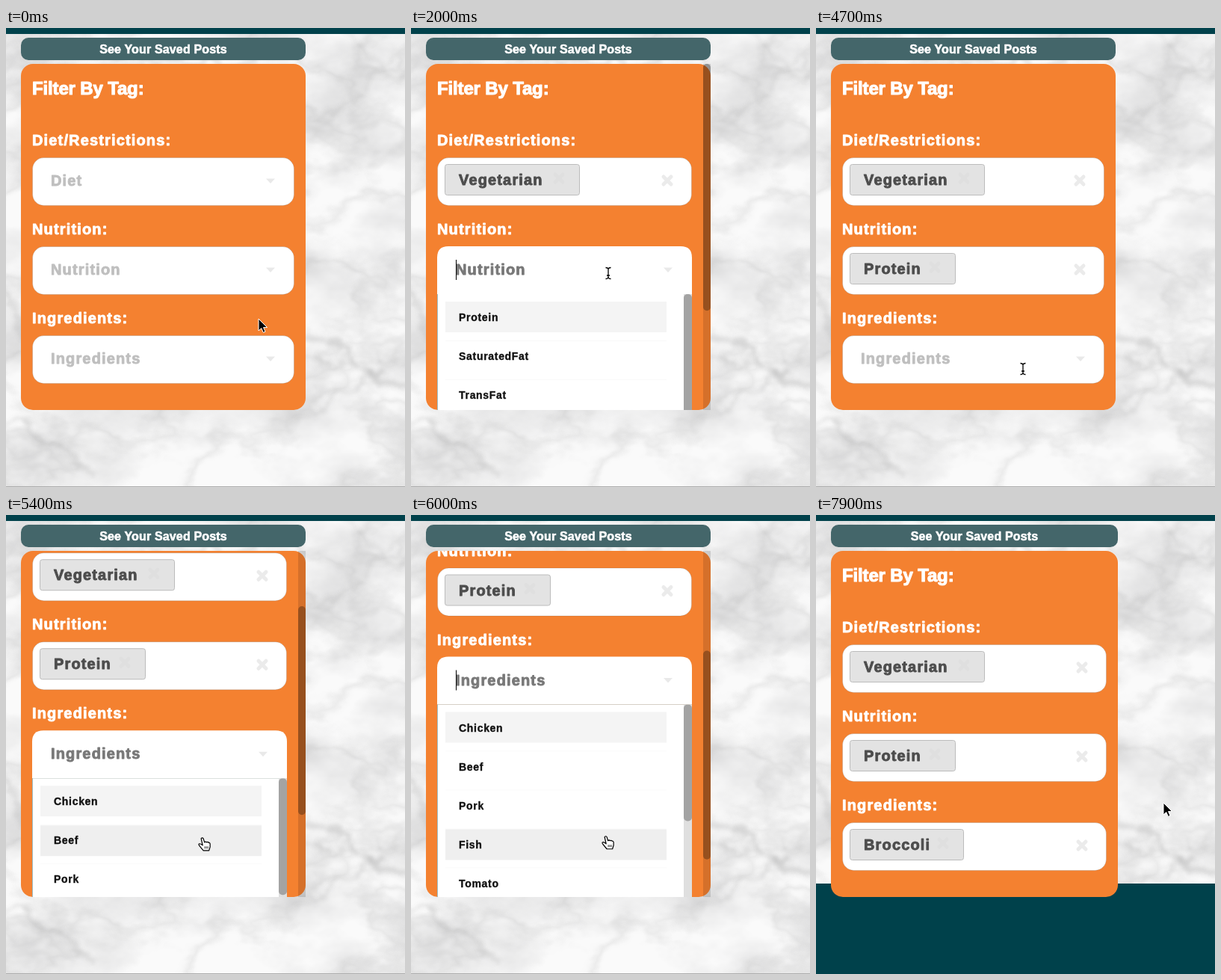
Recreate the animation shown at these times as an HTML page. Size 534 by 614 pixels, loop 8000 ms.

```html
<!DOCTYPE html>
<html lang="en">
<head>
<meta charset="utf-8">
<title>Tag filter</title>
<style>
  html, body { margin: 0; width: 100%; height: 100%; overflow: hidden; background: #f8f8f8; }
  svg { position: absolute; left: 0; top: 0; display: block; }
  #marble { will-change: transform; }
  text {
    font: bold 20px "Liberation Sans", Arial, sans-serif;
    letter-spacing: 1.15px;
    fill: currentColor; stroke: currentColor;
    stroke-width: .9; stroke-linejoin: round;
  }
  .title { font-size: 24px; letter-spacing: -.15px; stroke-width: 1.1; }
  .button { font-size: 16px; letter-spacing: .15px; stroke-width: .6; }
  .item { font-size: 14px; letter-spacing: .7px; stroke-width: .35; }
</style>
</head>
<body>
<svg id="marble" width="534" height="614" viewBox="0 0 534 614">
  <defs>
    <filter id="clouds" x="0" y="0" width="1" height="1" color-interpolation-filters="sRGB">
      <feTurbulence type="fractalNoise" baseFrequency=".008 .011" numOctaves="5" seed="11"/>
      <feColorMatrix values="0 0 0 0 .55  0 0 0 0 .55  0 0 0 0 .56  .55 0 0 0 -.2"/>
    </filter>
    <filter id="ridges" x="0" y="0" width="1" height="1" color-interpolation-filters="sRGB">
      <feTurbulence type="fractalNoise" baseFrequency=".006 .009" numOctaves="5" seed="4"/>
      <feColorMatrix values="0 0 0 0 .5  0 0 0 0 .5  0 0 0 0 .5  0 1 0 0 0"/>
      <feComponentTransfer><feFuncA type="table" tableValues="0 0 0 0 0 0 .02 .12 .01 0 0 0 0 0 0"/></feComponentTransfer>
    </filter>
    <filter id="rough" x="-100" y="-100" width="800" height="900" filterUnits="userSpaceOnUse">
      <feTurbulence type="fractalNoise" baseFrequency=".03" numOctaves="4" seed="7"/>
      <feDisplacementMap in="SourceGraphic" scale="40" xChannelSelector="R" yChannelSelector="G"/>
      <feGaussianBlur stdDeviation="2.5"/>
    </filter>
  </defs>
  <rect width="534" height="614" fill="#fafafa"/>
  <rect width="534" height="614" filter="url(#clouds)"/>
  <rect width="534" height="614" filter="url(#ridges)"/>
  <g filter="url(#rough)" fill="none" stroke="#777" stroke-linecap="round">
    <path d="M385 405Q450 425 475 455T560 475" stroke-width="9" opacity=".17"/>
    <path d="M400 440Q450 455 560 440M385 520Q440 500 500 462" stroke-width="5" opacity=".14"/>
    <path d="M440 -10Q480 50 550 70M410 130Q460 110 510 40" stroke-width="5" opacity=".12"/>
    <path d="M-20 340Q20 370 30 430M-20 520Q60 540 120 600" stroke-width="9" opacity=".12"/>
    <path d="M120 30Q220 55 340 40" stroke-width="8" opacity=".16"/>
  </g>
</svg>
<svg id="stage" width="534" height="614" viewBox="0 0 534 614"></svg>
<script>
const LOOP = 8000, STEP = 100;
const TOP = 48, VIEW = 463, MENU = 341, PITCH = 52;
const TEAL = '#00414b';

const fields = [
  { label: 'Diet/Restrictions:', hint: 'Diet', y: 173, open: 600, pick: 1400, chip: 181,
    items: ['Vegetarian', 'Vegan', 'Pescatarian', 'Keto', 'Paleo', 'GlutenFree', 'DairyFree', 'NutFree'] },
  { label: 'Nutrition:', hint: 'Nutrition', y: 292, open: 1900, pick: 4200, chip: 142,
    items: ['Protein', 'SaturatedFat', 'TransFat', 'Carbs', 'Sodium', 'Sugar', 'Fiber',
      'Calcium', 'Iron', 'Potassium', 'VitaminA', 'VitaminC', 'VitaminD'] },
  { label: 'Ingredients:', hint: 'Ingredients', y: 411, open: 4800, pick: 7300, chip: 153, choice: 5,
    items: ['Chicken', 'Beef', 'Pork', 'Fish', 'Tomato', 'Broccoli', 'Potato', 'Rice',
      'Onion', 'Garlic', 'Cheese', 'Egg', 'Carrot', 'Beans'] }
];

// Tracks of [time, value, ...]; values ease between neighbours.
const pointer = [
  [0, 338, 389], [100, 338, 389], [500, 265, 208], [900, 265, 208], [1200, 200, 270], [1400, 200, 270],
  [1900, 264, 328], [2300, 264, 328], [2800, 188, 416], [3400, 188, 416], [3900, 190, 388],
  [4200, 190, 388], [4700, 277, 456], [5000, 277, 456], [5500, 261, 429], [6700, 260, 431],
  [7100, 262, 456], [7300, 262, 456], [7900, 465, 385]
];
const panelScroll = [[0, 0], [5000, 0], [5500, 137], [5700, 137], [6300, 306], [7300, 306]];
const listScroll = [[0, 0], [2800, 0], [3200, 31], [3400, 31], [3800, 0]];

function sample(track, t) {
  const i = track.findIndex(k => k[0] > t);
  if (i < 0) return track[track.length - 1].slice(1);
  const a = track[i - 1], b = track[i];
  const p = (t - a[0]) / (b[0] - a[0]), e = p * p * (3 - 2 * p);
  return a.slice(1).map((v, n) => v + (b[n + 1] - v) * e);
}

const rect = (x, y, w, h, fill, r = 0, more = '') =>
  `<rect x="${x}" y="${y}" width="${w}" height="${h}" rx="${r}" fill="${fill}" ${more}/>`;
const text = (x, y, s, color, cls = '', more = '') =>
  `<text x="${x}" y="${y}" color="${color}" class="${cls}" ${more}>${s}</text>`;
const cross = (x, y, color) =>
  `<path d="M${x - 5} ${y - 5}l10 10m0 -10l-10 10" stroke="${color}" stroke-width="5" stroke-linecap="round"/>`;
const clip = (id, shape, body) =>
  `<clipPath id="${id}">${shape}</clipPath><g clip-path="url(#${id})">${body}</g>`;

function cursor(kind, x, y) {
  const shapes = {
    arrow: '<path d="M0 0V16L3.8 12.6L6.4 18.4L9 17.2L6.5 11.6H11.6Z" fill="#000" stroke="#fff"/>',
    beam: ['#fff" stroke-width="3', '#000" stroke-width="1.3'].map(s =>
      `<path d="M-3.5 -7.5Q0 -7.5 0 -5V5Q0 7.5 -3.5 7.5M3.5 -7.5Q0 -7.5 0 -5V5Q0 7.5 3.5 7.5M-2 3H2" fill="none" stroke="${s}"/>`).join(''),
    hand: `<path d="M-1.5 1Q0 -1 1.5 1L3 6Q4.500 4.500 6 6Q7.500 5 8.500 6.500Q10 6 10.500 8L10.500 12L9 17H1.500L-3.500 11Q-5.500 8.500 -4 8Q-2.500 7.500 .5 10Z"
      fill="#fff" stroke="#000" stroke-width="1.2" stroke-linejoin="round"/><path d="M3.500 11.500v3m2 -3v3m2 -3v3" stroke="#000" stroke-width=".8"/>`
  };
  return `<g transform="translate(${x} ${y})">${shapes[kind]}</g>`;
}

function menu(f, right, scroll, over) {
  const y = f.y + 64, size = f.items.length * PITCH + 17;
  const thumb = MENU * MENU / size;
  let rows = '';
  f.items.forEach((name, i) => {
    const top = y + 10 + i * PITCH - scroll;
    const fill = i === over ? '#efefef' : i === 0 ? '#f4f4f4' : '#fff';
    if (i) rows += rect(46, top, 296, 1, '#f9f9f9');
    rows += rect(46, top + (i ? 1 : 0), 296, 41, fill) + text(64, top + 26, name, '#111', 'item');
  });
  return rect(35, y, right - 35, MENU, '#96bfcb') +
    clip('list', rect(36, y, right - 36, MENU - 1, '#000'),
      rect(36, y, right - 36, MENU, '#fff') + rows +
      rect(right - 11, y, 11, MENU, '#dfdfdf') +
      rect(right - 11, y + scroll * MENU / size, 11, thumb, '#a3a3a3', 5));
}

function field(f, t, right, isOpen) {
  const { y } = f, w = right - 35, r = 15;
  const border = 'stroke="#22242626"';
  let out = text(35, y - 16, f.label, '#fff');
  out += isOpen
    ? `<path d="M35 ${y + 64}V${y + r}q0 ${-r} ${r} ${-r}H${right - r}q${r} 0 ${r} ${r}V${y + 64}Z" fill="#fff"/>`
    : rect(35.5, y + .5, w - 1, 64, '#fff', r, border);
  if (t >= f.pick) {
    out += rect(45.5, y + 9.5, f.chip - 1, 41, '#e3e3e3', 3, 'stroke="#bcbcbc"') +
      text(64, y + 37, f.items[f.choice || 0], '#4d4d4d') +
      cross(45 + f.chip - 28, y + 28, '#dfdfdf') + cross(right - 33, y + 31, '#ebebeb');
  } else {
    out += text(60, y + 38, f.hint, isOpen ? '#787878' : '#bfbfbf') +
      `<path d="M${right - 38} ${y + 28.5}h12l-6 6.500z" fill="#e9e9e9"/>`;
    if (isOpen && (t - f.open) % 1000 < 500) out += rect(60, y + 18, 1, 27, '#000');
  }
  return out;
}

function scene(t) {
  const done = t >= 7300;
  const open = fields.find(f => t >= f.open && t < f.pick);
  const edge = done ? 404 : 401, width = edge - 20;
  const right = edge - 15 - (open ? 10 : 0);
  const scroll = open ? sample(panelScroll, t)[0] : 0;
  const rowScroll = open === fields[1] ? sample(listScroll, t)[0] : 0;
  const [x, y] = sample(pointer, t);

  let kind = 'arrow', over = -1;
  const py = y + scroll;
  if (open && x > 46 && x < 342 && py > open.y + 64) {
    const d = py - open.y - 74 + rowScroll, i = Math.floor(d / PITCH);
    if (d >= 0 && d - i * PITCH < 41) { over = i; kind = 'hand'; }
  } else if (x > 35 && x < right - 45 && fields.some(f => py > f.y && py < f.y + 64)) kind = 'beam';

  let body = rect(20, TOP, width, VIEW, '#f48130');
  let inner = text(35, 89, 'Filter By Tag:', '#fff', 'title') +
    fields.map(f => field(f, t, right, f === open)).join('');
  if (open) inner += menu(open, right, rowScroll, over);
  body += `<g transform="translate(0 ${-scroll})">${inner}</g>`;

  let out = rect(0, 0, 534, 8, TEAL);
  out += done ? rect(0, 493, 534, 121, TEAL) : rect(0, 613, 534, 1, '#adadad');
  out += rect(20, 13, width, 30, '#44666a', 10) +
    text(20 + width / 2, 34, 'See Your Saved Posts', '#fff', 'button', 'text-anchor="middle"') +
    clip('panel', rect(20, TOP, width, VIEW, '#000', 16), body);
  if (open) {
    const size = open.y + 64 + MENU - TOP;
    out += rect(391, TOP, 10, VIEW, 'rgba(0,0,0,.13)') +
      rect(391, TOP + scroll * VIEW / size, 10, VIEW * VIEW / size, 'rgba(0,0,0,.29)', 5);
  }
  return out + cursor(kind, x, y);
}

const stage = document.getElementById('stage');
const start = performance.now();
let last = -1;
function draw() {
  const t = Math.floor((performance.now() - start) % LOOP / STEP) * STEP;
  if (t !== last) stage.innerHTML = scene(last = t);
  requestAnimationFrame(draw);
}
draw();
</script>
</body>
</html>
```
